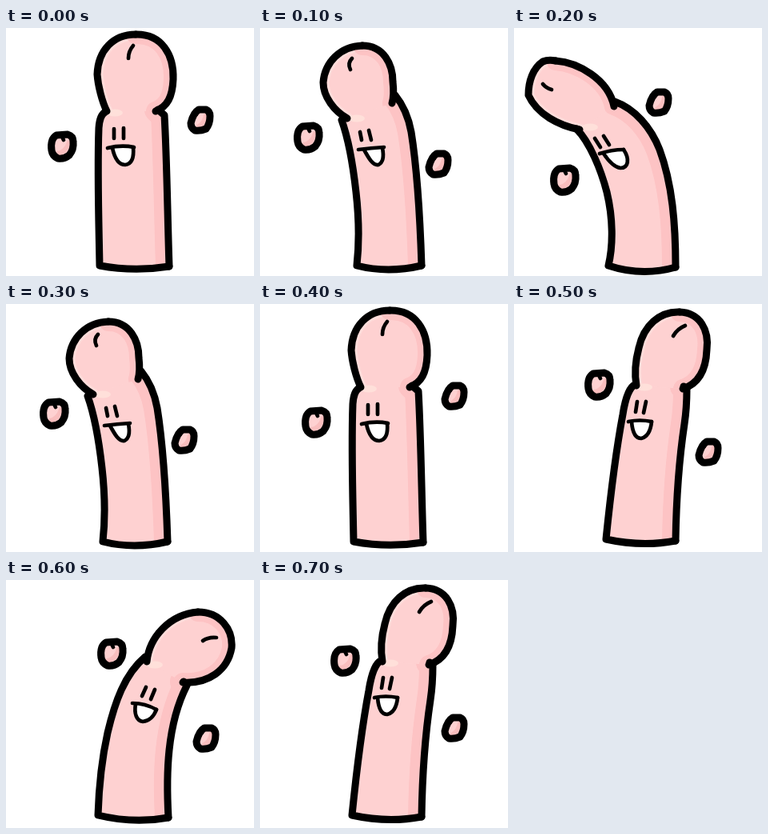
An HTML page for the animation above (800 ms loop, 310 by 310 pixels).

```html
<!DOCTYPE html>
<html lang="en">
<head>
<meta charset="utf-8">
<title>Wobble</title>
<style>
html, body { margin: 0; width: 100%; height: 100%; overflow: hidden; background: #fff; }
svg { display: block; width: 100%; height: 100%; }
.pose { visibility: hidden; animation: 800ms step-end infinite; }
.upright { animation-name: upright; }
.left { animation-name: left; }
.farLeft { animation-name: farLeft; }
.right { animation-name: right; }
.farRight { animation-name: farRight; }
@keyframes upright { 0%, 50% { visibility: visible } 12.5%, 62.5%, 100% { visibility: hidden } }
@keyframes left { 0%, 25%, 50%, 100% { visibility: hidden } 12.5%, 37.5% { visibility: visible } }
@keyframes farLeft { 0%, 37.5%, 100% { visibility: hidden } 25% { visibility: visible } }
@keyframes right { 0%, 75% { visibility: hidden } 62.5%, 87.5%, 100% { visibility: visible } }
@keyframes farRight { 0%, 87.5%, 100% { visibility: hidden } 75% { visibility: visible } }
path { fill: none; stroke-linecap: round; stroke-linejoin: round; }
.skin { fill: #fed1d1; }
.shade { stroke: #fdc3c4; stroke-width: 34; }
.cheek { stroke: #fdc3c4; stroke-width: 24; }
.light { stroke: #ffdcda; stroke-width: 15; }
.glow { fill: #ffe0da; }
.line { stroke: #000; stroke-width: 9; }
.thin { stroke: #000; stroke-width: 4.7; }
.mouth { fill: #fff; }
</style>
</head>
<body>
<svg id="stage" viewBox="0 0 310 310"></svg>
<script>
// Each pose: body side + base, other side, two halves of the head, face, neck glow, hand centres.
const poses = {
  upright: {
    side: 'M124 105Q117 109 116 125C114 180 116 240 117 297Q160 305 204 298',
    back: 'M204 298C202 240 201 160 198 109L190 102',
    headL: 'M126 104C120 92 115 72 114 58C115 28 134 8 162 8',
    headR: 'M162 8C195 7 210 34 209 64C208 86 202 98 187 104',
    slit: 'M159 22Q153 29 153 38',
    eyes: 'M135 126V138M147 125V138',
    lip: 'M127 150Q144 146 160 149',
    mouth: 'M133 150C136 164 141 171 149 171C158 170 160 160 159 149',
    glow: [136, 106], hands: [[70, 148], [243, 115]]
  },
  left: {
    side: 'M106 112L102 115C111 140 117 178 120 205C124 240 124 270 121 297Q160 307 202 297',
    back: 'M202 297C200 235 197 180 189 130C185 108 178 95 169 84',
    headL: 'M109 113C93 104 79 86 79 68C81 43 100 23 128 22',
    headR: 'M128 22C155 22 166 46 166 67Q168 84 165 94',
    slit: 'M115 38Q109 44 113 52',
    eyes: 'M125 130L127 140M136 128L139 140',
    lip: 'M123 152Q139 150 155 149',
    mouth: 'M130 152C136 163 141 172 148 171C154 168 155 160 153 150',
    glow: [121, 113], hands: [[60, 137], [223, 170]]
  },
  farLeft: {
    side: 'M78 126C95 143 109 178 116 205C124 238 124 272 118 297Q160 311 202 299',
    back: 'M202 299C202 245 198 195 182 152C171 124 151 101 126 92',
    headL: 'M82 127C56 122 29 108 18 84C18 66 24 50 36 42Q43 39 52 41',
    headR: 'M52 41C80 43 118 64 125 98',
    slit: 'M36 70Q40 75 47 77',
    eyes: 'M101 138L108 149M112 135L119 146',
    lip: 'M107 157Q122 152 137 152',
    mouth: 'M112 157C118 166 126 174 133 175C143 175 145 164 137 152',
    glow: [95, 124], hands: [[63, 190], [181, 93]]
  },
  right: {
    side: 'M151 101C144 104 139 119 136 138C127 186 120 245 115 294Q160 304 202 296',
    back: 'M202 296C203 235 207 190 213 150Q216 130 216 107L212 103',
    headL: 'M153 102C150 85 152 70 156 55C162 27 182 9 207 10',
    headR: 'M207 10C233 11 244 33 241 57C240 83 230 100 211 106',
    slit: 'M214 27Q204 31 199 40',
    eyes: 'M154 122L152 135M165 122L162 136',
    lip: 'M143 147Q157 144 172 147',
    mouth: 'M147 147C148 160 152 168 159 168C167 166 171 157 172 147',
    glow: [163, 104], hands: [[106, 101], [243, 185]]
  },
  farRight: {
    side: 'M174 96C148 118 136 153 127 191C119 227 116 262 115 294Q160 305 203 297',
    back: 'M203 297C200 243 201 181 226 132L222 127',
    headL: 'M176 102C179 72 204 43 240 40',
    headR: 'M240 40C268 40 284 62 282 85C277 113 253 130 221 128',
    slit: 'M263 72Q253 71 246 76',
    eyes: 'M175 134L170 145M186 137L181 149',
    lip: 'M158 154Q174 154 188 162',
    mouth: 'M162 155C160 167 163 176 171 177C180 176 185 170 188 162',
    glow: [186, 106], hands: [[132, 92], [250, 198]]
  }
};

const path = (cls, d) => `<path class="${cls}" d="${d}"/>`;
const join = (a, b) => a + b.replace('M', 'L');

function hand([x, y], isLeft) {
  const ring = isLeft
    ? 'M-7-14L7-15Q14-13 14-6Q15 4 9 11Q3 16-5 15Q-12 12-13 5Q-15-9-7-14Z'
    : 'M-2-13L7-13Q12-11 12-5Q12 5 7 11Q0 14-7 13Q-12 10-12 4Q-9-9-2-13Z';
  const dent = isLeft ? 'M0-12L2-8' : 'M-6-8L-5-7';
  const tone = isLeft ? 'M-5 9Q5 7 9-5' : 'M-2 8Q5 4 7-6';
  return `<g transform="translate(${x} ${y})">` + path('skin', ring) +
    `<path d="${tone}" stroke="#f9bebe" stroke-width="6"/>` +
    path('line', ring) + path('thin', dent) + '</g>';
}

function draw([name, p]) {
  const body = join(p.side, p.back) + 'Z';
  const head = join(p.headL, p.headR) + 'Z';
  const [gx, gy] = p.glow;
  return `<g class="pose ${name}">
    <clipPath id="${name}-body"><path d="${body}"/></clipPath>
    <clipPath id="${name}-head"><path d="${head}"/></clipPath>
    <g clip-path="url(#${name}-body)">${path('skin', body) + path('shade', p.back)}</g>
    <g clip-path="url(#${name}-head)">
      ${path('skin', head) + path('light', p.headL) + path('cheek', p.headR)}
    </g>
    <ellipse class="glow" cx="${gx}" cy="${gy}" rx="10" ry="4.5"/>
    ${[p.side, p.back, p.headL, p.headR].map(d => path('line', d)).join('')}
    ${path('thin mouth', p.mouth) + path('thin', p.lip) + path('thin', p.eyes) + path('thin', p.slit)}
    ${hand(p.hands[0], true) + hand(p.hands[1], false)}
  </g>`;
}

document.getElementById('stage').innerHTML = Object.entries(poses).map(draw).join('');
</script>
</body>
</html>
```
